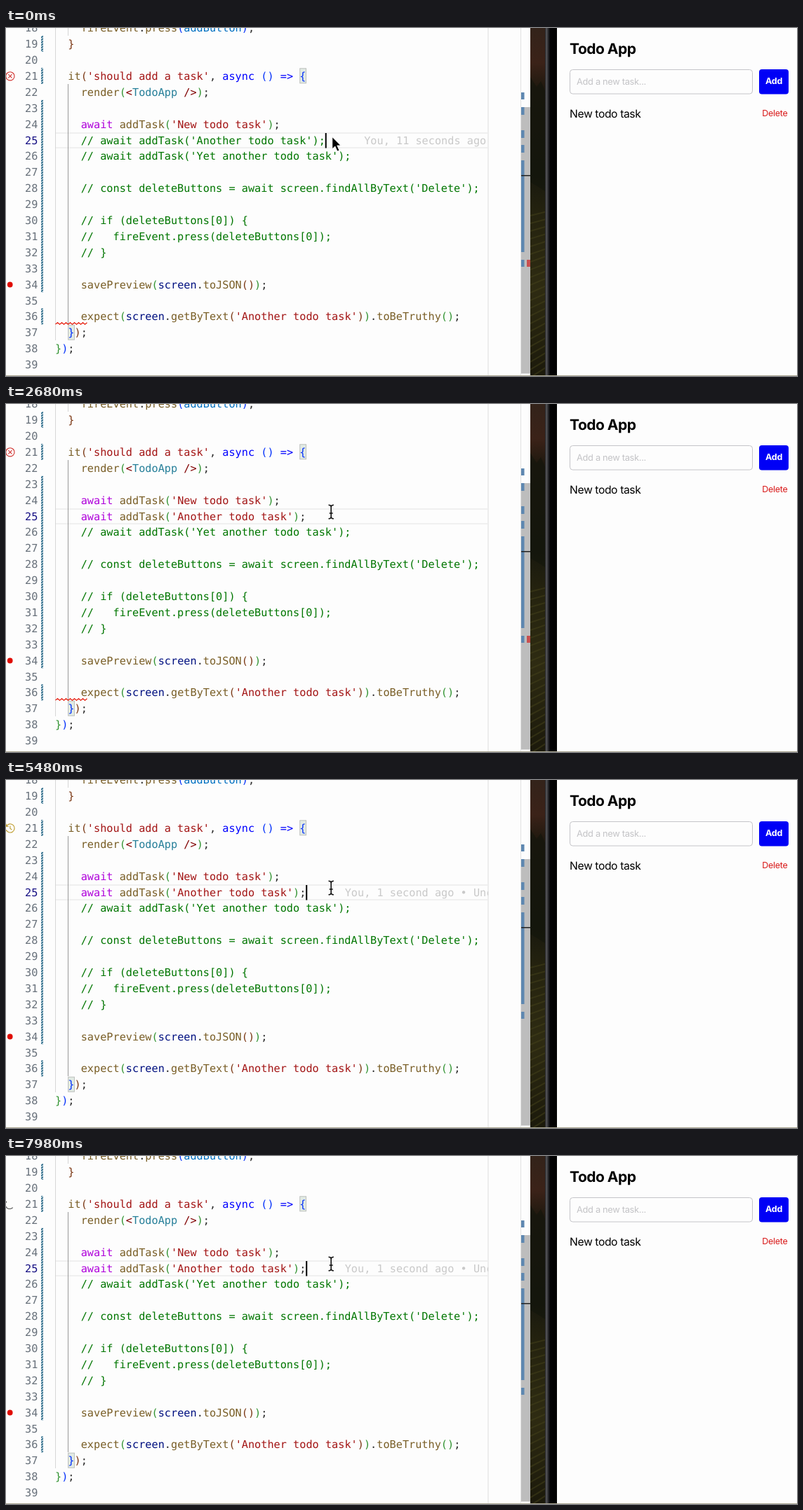
Write an HTML page that moves like this. It is 1127x497 px and loops after 8 s.

```html
<!DOCTYPE html>
<html lang="en">
<head>
<meta charset="utf-8">
<title>Todo test</title>
<style>
  html, body { margin: 0; width: 100%; height: 100%; overflow: hidden; background: #fdfdfd; }
  svg { display: block; width: 1127px; height: 497px; }
  text { white-space: pre; text-rendering: geometricPrecision; }
  .code { font: 15.23px "DejaVu Sans Mono", monospace; }
  .app { font-family: Inter, sans-serif; }
</style>
</head>
<body>
<svg id="stage" viewBox="0 0 1127 497">
  <defs>
    <pattern id="hatch" width="3" height="3" patternUnits="userSpaceOnUse" patternTransform="rotate(-35)">
      <rect width="3" height="3" fill="#e4eff4"/>
      <rect width="3" height="1.8" fill="#286786"/>
    </pattern>
    <linearGradient id="photo" x2="0" y2="1">
      <stop offset="0" stop-color="#33231a"/>
      <stop offset=".1" stop-color="#3b2218"/>
      <stop offset=".17" stop-color="#20190f"/>
      <stop offset=".42" stop-color="#18180e"/>
      <stop offset=".54" stop-color="#25230f"/>
      <stop offset=".75" stop-color="#2e2b12"/>
      <stop offset="1" stop-color="#1b190b"/>
    </linearGradient>
    <linearGradient id="bezel">
      <stop offset="0" stop-color="#17171a"/>
      <stop offset=".1" stop-color="#59595d"/>
      <stop offset=".25" stop-color="#29292c"/>
      <stop offset=".4" stop-color="#030304"/>
      <stop offset="1" stop-color="#000"/>
    </linearGradient>
    <clipPath id="pane"><rect width="687" height="497"/></clipPath>
    <clipPath id="strip"><rect x="747" width="22" height="497"/></clipPath>
  </defs>

  <g id="back"></g>
  <g id="code" class="code"></g>

  <g class="code" clip-path="url(#pane)">
    <text id="blame" y="165.6" fill="#c9c9c9"></text>
  </g>
  <rect id="caret" y="150" width="2" height="21.5" fill="#000"/>
  <path id="squiggle" fill="none" stroke="#e51400" stroke-width="1.1"/>
  <rect id="errorMark" x="742" y="331" width="5" height="10" fill="#c85050"/>

  <circle cx="5.7" cy="366.5" r="3.9" fill="#e00b00"/>
  <g fill="none" stroke-width="1.1" transform="translate(5.9 68.8)">
    <g id="failed" stroke="#d0302c">
      <circle r="6.1"/><path d="M-2.6-2.6 2.6 2.6M2.6-2.6-2.6 2.6"/>
    </g>
    <g id="queued" stroke="#bd9b2a">
      <path d="M-5.2-3A6.1 6.1 0 1 1-5.6 2.4M-5.6-6v3.3h3.3M0-3.3V.5L2.6 2.3"/>
    </g>
    <path id="spinner" stroke="#4a4a4a" d="M-6.2-.8A6.2 6.2 0 0 1 6.2-.8"/>
  </g>

  <g id="phone" class="app">
    <rect x="803.5" y="59.5" width="260" height="34.5" rx="4" fill="#fdfdfd" stroke="#c4c4c8"/>
    <rect x="1073" y="59" width="42" height="35.5" rx="4" fill="#0000f6"/>
    <text x="803" y="36.6" font-size="21" font-weight="700" letter-spacing="-.5" fill="#000">Todo App</text>
    <text x="813" y="81.3" font-size="12.8" letter-spacing="-.3" fill="#c3c3c6">Add a new task...</text>
    <text x="1082" y="80.2" font-size="12.5" font-weight="700" letter-spacing="-.2" fill="#fff">Add</text>
    <text x="803" y="127.6" font-size="15.7" letter-spacing="-.4" fill="#000">New todo task</text>
    <text x="1077.3" y="126.2" font-size="12.5" letter-spacing="-.3" fill="#d81818">Delete</text>
  </g>

  <path id="arrow" d="M464.7 155v18.2l4.1-3.8 3.1 6.9 3.2-1.4-3-6.8h5.5z" fill="#000" stroke="#fff" stroke-width="1.1"/>
  <g id="beam" fill="none">
    <path id="beamPath" d="M459.5 144.2q3.5 0 3.7 2.6 .2-2.6 3.7-2.6M463.2 146v16M459.5 163.8q3.5 0 3.7-2.6 .2 2.6 3.7 2.6M460.7 156h5" stroke="#111" stroke-width="1.6"/>
  </g>
  <rect y="496" width="1127" height="1" fill="#aaa692"/>
</svg>

<script>
const LOOP = 8000, CHAR = 9.17, LEFT = 70, PITCH = 22.9;
const UNCOMMENT = 1540, RERUN = 3800, RUNNING = 6300;
const $ = id => document.getElementById(id);
const colX = col => LEFT + col * CHAR;
const midY = line => 22.6 + (line - 19) * PITCH;

function add(parent, tag, attrs, text) {
  const el = document.createElementNS('http://www.w3.org/2000/svg', tag);
  for (const k in attrs) el.setAttribute(k, attrs[k]);
  if (text) el.textContent = text;
  parent.append(el);
  return el;
}
const box = (x, y, width, height, fill, more) =>
  add($('back'), 'rect', { x, y, width, height, fill, ...more });

const INK = {
  f: '#795e26', k: '#2b2b2b', s: '#a31515', p: '#af00db', b: '#0000ff', v: '#001080',
  t: '#267f99', c: '#007600', o: '#0070c1', r: '#800000',
  1: '#0431fa', 2: '#319331', 3: '#7b3814'
};

// Each token starts with the letter of its colour.
const LINES = {
  18: [4, 'ffireEvent|k.|fpress|1(|oaddButton|1)|k;'],
  19: [2, '3}'],
  21: [2, "fit|3(|s'should add a task'|k, |basync|k |1()|k |b=>|k |1{"],
  22: [4, 'frender|2(|r<|tTodoApp|k |r/>|2)|k;'],
  24: [4, "pawait|k |faddTask|2(|s'New todo task'|2)|k;"],
  26: [4, "c// await addTask('Yet another todo task');"],
  28: [4, "c// const deleteButtons = await screen.findAllByText('Delete');"],
  30: [4, 'c// if (deleteButtons[0]) {'],
  31: [4, 'c//   fireEvent.press(deleteButtons[0]);'],
  32: [4, 'c// }'],
  34: [4, 'fsavePreview|2(|vscreen|k.|ftoJSON|3()|2)|k;'],
  36: [4, "fexpect|2(|vscreen|k.|fgetByText|3(|s'Another todo task'|3)|2)|k.|ftoBeTruthy|2()|k;"],
  37: [2, '1}|3)|k;'],
  38: [0, '2}|1)|k;']
};

function codeLine(line, col, tokens) {
  const row = add($('code'), 'text', { x: colX(col), y: midY(line) + 5.5 });
  for (const tok of tokens.split('|')) add(row, 'tspan', { fill: INK[tok[0]] }, tok.slice(1));
  return row;
}

function drawEditor() {
  box(70.5, 150, 616, 21, 'none', { stroke: '#e3e3e3' });
  box(70, 0, 1, 446, '#d6d6d6');
  box(88, 0, 1, 11, '#d6d6d6');
  box(88, 80, 1, 343, '#9a9a9a');
  for (const [col, line] of [[38, 21], [2, 37]])
    box(colX(col) + .3, midY(line) - 10.6, 8.8, 21, '#e2ebe4', { stroke: '#bcbfbc' });
  for (const [from, to] of [[19, 19], [21, 21], [23, 34], [36, 36]])
    box(50, midY(from) - 11.5, 3, (to - from + 1) * PITCH, 'url(#hatch)');

  box(686, 0, 2, 497, '#ededed');
  box(733, 0, 1, 497, '#e2e2e2');
  box(734, 113, 13, 380.5, '#bdbdbd');
  for (const [y, h] of [[92, 10], [113, 11], [146, 11], [167, 11], [189, 131], [331, 10]])
    box(734, y, 4.5, h, '#5e87b0');
  box(734, 210, 13, 1.5, '#222');

  for (let n = 18; n <= 39; n++) {
    add($('code'), 'text', {
      x: 45.3, y: midY(n) + 5.5, 'text-anchor': 'end', fill: n === 25 ? '#171184' : '#67707a'
    }, String(n));
    if (LINES[n]) codeLine(n, ...LINES[n]);
  }
  let d = 'M70.5 423';
  for (let i = 1; i <= 15; i++) d += `L${70.5 + i * 3} ${i % 2 ? 420.8 : 423.2}`;
  $('squiggle').setAttribute('d', d);
}

function drawPhone() {
  box(747, 0, 24, 497, 'url(#photo)');
  const strip = add($('back'), 'g', { 'clip-path': 'url(#strip)' });
  add(strip, 'path', { d: 'M747 70l9 14 6-8 8 18v140l-23-14z', fill: '#11150c', opacity: .55 });
  for (let y = 268; y < 520; y += 11)
    add(strip, 'path', { d: `M747 ${y}l24 -${6 + (y - 268) / 25}`, stroke: '#46431c', 'stroke-width': 2, opacity: .5 });
  box(768, 0, 18, 497, 'url(#bezel)');
  box(785, 0, 342, 497, '#fdfdfd');
}

drawEditor();
drawPhone();
const before = codeLine(25, 4, "c// await addTask('Another todo task');");
const after = codeLine(25, 4, "pawait|k |faddTask|2(|s'Another todo task'|2)|k;");

// White rim behind the text pointer.
const rim = $('beamPath').cloneNode();
rim.removeAttribute('id');
rim.setAttribute('stroke', '#fff');
rim.setAttribute('stroke-width', 3);
$('beam').prepend(rim);

const show = (el, on) => { el.style.display = on ? '' : 'none'; };

function caretOn(t) {
  if (t < UNCOMMENT) return t % 1000 < 500;
  return t < 2305 || (t - 2740 + 870) % 870 < 435;
}

function draw(t) {
  const edited = t >= UNCOMMENT, rerun = t >= RERUN, running = t >= RUNNING;
  const end = colX(edited ? 39 : 42);
  show(before, !edited);
  show(after, edited);
  show($('arrow'), t < 800);
  show($('beam'), t >= 800);
  show($('caret'), caretOn(t));
  $('caret').setAttribute('x', end - .4);

  show($('blame'), t < 1800 || t >= 5100);
  $('blame').setAttribute('x', end + 6 * CHAR);
  const age = t < RERUN ? '11 seconds' : '1 second';
  $('blame').textContent = `You, ${age} ago • Uncommitted changes`;

  for (const id of ['squiggle', 'errorMark', 'failed']) show($(id), !rerun);
  show($('queued'), rerun && !running);
  show($('spinner'), running);
  $('spinner').setAttribute('transform', `rotate(${(t - 6840) * .197})`);
}

const start = performance.now();
function tick() {
  draw((performance.now() - start) % LOOP);
  requestAnimationFrame(tick);
}
draw(0);
requestAnimationFrame(tick);
</script>
</body>
</html>
```
